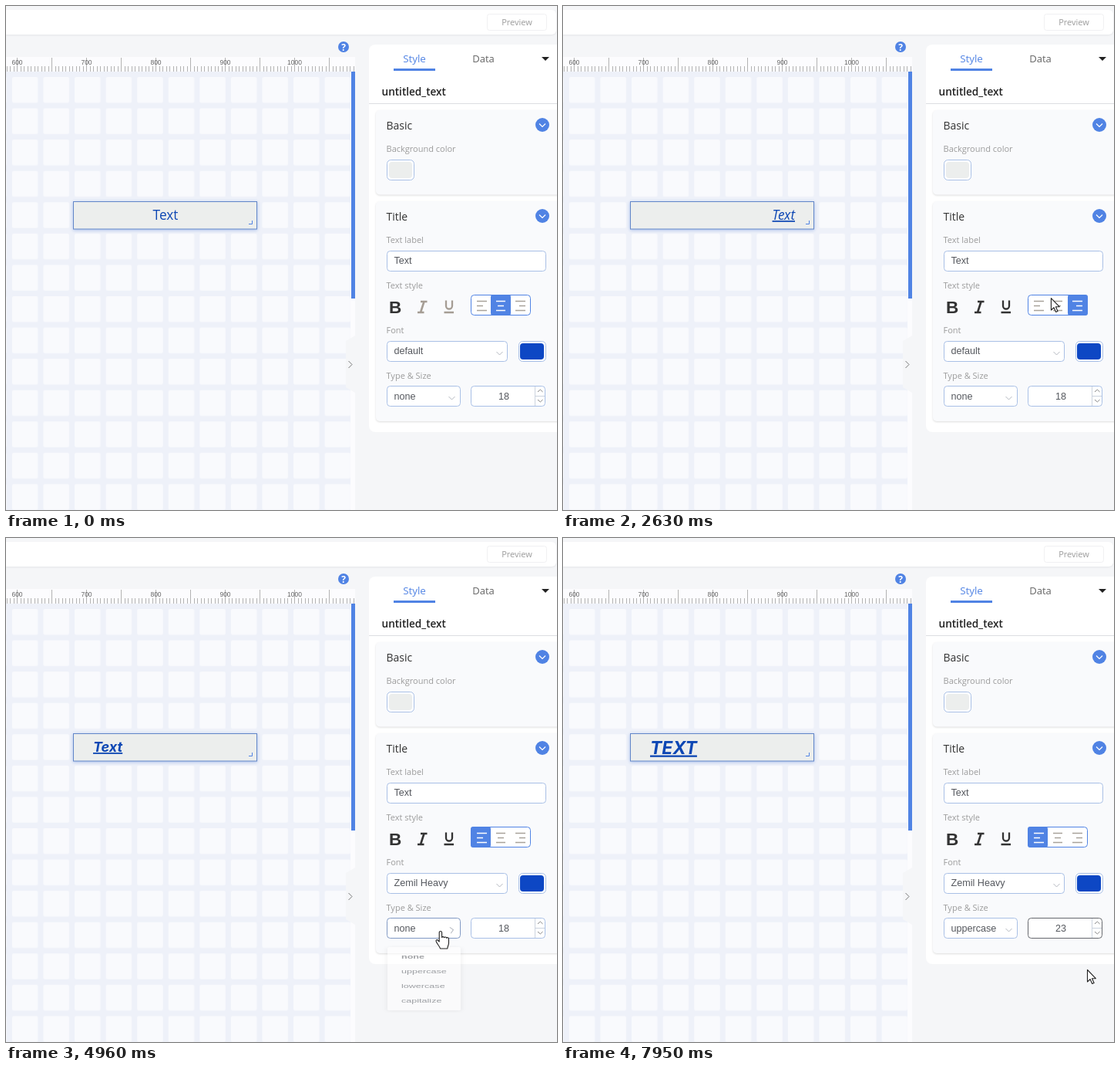
Write an HTML page that moves like this. It is 715 px wide and 653 px high and loops after 8000 ms.

```html
<!DOCTYPE html>
<html lang="en">
<head>
<meta charset="utf-8">
<title>Text style panel</title>
<style>
html, body { margin: 0; width: 100%; height: 100%; overflow: hidden; background: #f5f6f8; }
svg { display: block; width: 715px; height: 653px; }
text { font-family: "Open Sans", "Noto Sans", sans-serif; white-space: pre; }
.label { font-size: 11px; fill: #9b9b9b; }
.head { font-size: 14px; fill: #333; }
.value, .menu text { font: 12.6px "Liberation Sans", sans-serif; fill: #55585e; }
.field { fill: #fff; stroke: #a9c0e6; }
.line { fill: none; stroke: #b4b8c0; }
.blue { fill: #5083e4; }
.card { fill: #f9fafc; filter: drop-shadow(0 1px 1px #0002); }
.menu rect { fill: #fff; filter: drop-shadow(0 1px 4px #0002); }
.icon { fill: none; stroke-width: 2.6; }
.bars { fill: none; stroke-width: 1.5; }
</style>
</head>
<body>
<svg viewBox="0 0 715 653">
  <defs>
    <pattern id="grid" x="7.9" y="92" width="40.57" height="40.57" patternUnits="userSpaceOnUse">
      <rect width="33.5" height="33.5" rx="2" fill="#f9fafd"/>
    </pattern>
  </defs>
  <rect width="715" height="653" fill="#f5f6f8"/>
  <path d="M0 5H708a6 6 0 0 1 6 6V31a6 6 0 0 1-6 6H0z" fill="#fff" filter="drop-shadow(0 1px 1px #0001)"/>
  <rect x="624.5" y="10.5" width="77" height="21" rx="3" fill="#fff" stroke="#f0f0f2"/>
  <text class="label" x="663" y="25" text-anchor="middle">Preview</text>
  <circle class="blue" cx="438" cy="53" r="7"/>
  <text x="438" y="57.5" font-size="12" font-weight="700" fill="#fff" text-anchor="middle">?</text>

  <rect y="66" width="453" height="587" fill="#fcfcfe"/>
  <g id="ruler"></g>
  <rect y="85" width="447" height="568" fill="#eef1f9"/>
  <rect y="85" width="447" height="568" fill="url(#grid)"/>
  <rect class="blue" x="448" y="85" width="5" height="294"/>
  <path d="M453 427L441 434V494L453 501z" fill="#f5f6f8"/>
  <path class="line" style="stroke:#777" d="M444.500 460l4.500 4.500-4.500 4.500"/>

  <rect x="87.500" y="253.500" width="238" height="35.500" fill="#eceeed" stroke="#6286c8" filter="drop-shadow(0 1px 2px #4478d866)"/>
  <path class="line" style="stroke:#5083e4" d="M315 282.500h4.500V278"/>
  <text id="sample" fill="#0d47b4"></text>

  <path d="M715 50H479a8 8 0 0 0-8 8V544a8 8 0 0 0 8 8H715z" fill="#fff"/>
  <text x="530" y="73" font-size="13.4" fill="#5083e4" text-anchor="middle">Style</text>
  <text x="619.500" y="73" font-size="13" fill="#666" text-anchor="middle">Data</text>
  <rect class="blue" x="503" y="81" width="54" height="3"/>
  <path d="M695 66h10l-5 5z" fill="#222"/>
  <text x="487.500" y="116" font-size="13.6" font-weight="600" fill="#222">untitled_text</text>
  <path d="M471 126.500H715" stroke="#dcdee2"/>
  <rect class="card" x="480" y="135" width="240" height="109.500" rx="5"/>
  <rect class="card" x="480" y="253" width="240" height="285" rx="5"/>
  <g id="heads"></g>

  <rect class="field" x="494.500" y="199.500" width="35" height="26" rx="5"/>
  <rect x="497" y="202" width="30" height="21" rx="4" fill="#eceeed"/>
  <rect class="field" x="494.500" y="317.500" width="206" height="26" rx="4"/>
  <text class="value" x="503.500" y="334">Text</text>

  <text x="497" y="398" style="font:bold 22.500px 'Liberation Sans',sans-serif" fill="#333">B</text>
  <path id="italic" class="icon" d="M538 383h8.500M534 397h8.500M542.500 383L538 397"/>
  <path id="under" class="icon" style="stroke-width:2.3" d="M571 381.500v7a4 4 0 0 0 8 0v-7M568.500 397h12.500"/>

  <rect x="603.500" y="374.500" width="77" height="26" rx="4" fill="#fff" stroke="#5083e4"/>
  <rect id="chosen" class="blue" y="374" width="26" height="27" rx="3"/>
  <path class="bars" d="M611 382.500h13M611 388.500h8M611 394.500h13"/>
  <path class="bars" d="M636 382.500h12M638 388.500h8M636 394.500h12"/>
  <path class="bars" d="M661 382.500h13M666 388.500h8M661 394.500h13"/>

  <rect id="fontBox" class="field" x="494.500" y="434.500" width="156" height="26" rx="4"/>
  <text id="fontName" class="value" x="503.500" y="451"></text>
  <path id="fontArrow" class="line" d="M-4-2l4 4 4-4"/>
  <rect class="field" x="665.500" y="434.500" width="35" height="26" rx="5"/>
  <rect x="667" y="437" width="31" height="21" rx="4" fill="#0d47c4"/>
  <rect id="caseBox" class="field" x="494.500" y="492.500" width="95" height="26" rx="4"/>
  <text id="caseName" class="value" x="503.500" y="510"></text>
  <path id="caseArrow" class="line" d="M-4-2l4 4 4-4"/>
  <rect id="sizeBox" class="field" x="603.500" y="492.500" width="96" height="26" rx="4"/>
  <path class="line" style="stroke:#ccd3de" d="M686.500 493v25M687 505.500h12"/>
  <path class="line" style="stroke:#888" d="M690 500l3.300-3 3.300 3M690 510l3.300 3 3.300-3"/>
  <text id="sizeText" class="value" x="646" y="510" text-anchor="middle"></text>

  <g id="fontMenu" class="menu"></g>
  <g id="caseMenu" class="menu"></g>

  <g id="cursor" stroke="#222" stroke-width="1.1" stroke-linejoin="round" fill="#fff">
    <path id="arrow" d="M.5.500V16l3.600-3.300 2.600 5.800 2.400-1.100-2.600-5.700h4.800z"/>
    <path id="hand" d="M-1.800 14V2.200a1.700 1.700 0 0 1 3.400 0V8.500a1.600 1.600 0 0 1 3 .3 1.600 1.600 0 0 1 3 .5 1.600 1.600 0 0 1 2.900 1V16c0 2-1.300 3.500-1.700 7H-.5c-.6-3-4.200-6-5.400-9.500-.5-2 1.500-2.500 2.600-1z"/>
  </g>
</svg>
<script>
const $ = id => document.getElementById(id);
const set = (el, attrs) => { for (const k in attrs) el.setAttribute(k, attrs[k]); };
const LOOP = 8000;
const TIMES = { italic: 1480, under: 1960, right: 2350, left: 2980,
  fontOpen: 3610, fontPick: 4260, caseOpen: 4910, casePick: 5520 };
const CLICKS = [6900, 7040, 7210, 7390, 7490];
const HEAVY = 'Zemil Heavy';

// Cursor tip: time, x, y
const PATH = [
  [70, 517, 526], [320, 288, 268], [460, 277, 259], [600, 277, 259], [1140, 525, 386],
  [1210, 543, 388], [1340, 547, 388], [1620, 550, 388], [1820, 572, 388], [2000, 572, 388],
  [2270, 667, 386], [2420, 667, 386], [2630, 633, 378], [2850, 614, 384], [3100, 614, 386],
  [3530, 590, 436], [3660, 583, 448], [3760, 583, 448], [4120, 560, 560], [4330, 560, 560],
  [4750, 563, 512], [4960, 564, 509], [5080, 564, 509], [5350, 555, 586], [5590, 555, 586],
  [5990, 646, 535], [6060, 652, 532], [6620, 689, 506], [6900, 692, 503], [7490, 692, 503], [7950, 680, 559]
];
const HAND = [[1210, 2050], [3480, 4520], [4760, 5680], [6500, 7600]];

let ruler = '';
for (let i = -3; i < 98; i++) {
  const x = 14.5 + i * 4.5;
  ruler += `<path d="M${Math.floor(x) + .5} ${i % 10 ? 78 : 67}V85" stroke="#b3b3b3"/>`;
  if (i % 20 === 0) ruler += `<text x="${x}" y="76" font-size="8.500" fill="#666" text-anchor="middle"
    style="font-family:'Liberation Sans',sans-serif">${600 + i * 5}</text>`;
}
$('ruler').innerHTML = ruler;

const labels = [['Background color', 189], ['Text label', 307], ['Text style', 366], ['Font', 424], ['Type &amp; Size', 483]];
$('heads').innerHTML =
  [['Basic', 154], ['Title', 272]].map(([s, y]) => `<text class="head" x="493.500" y="${y + 6}">${s}</text>
    <circle class="blue" cx="696" cy="${y}" r="9"/>
    <path d="M692 ${y - 1.5}l4 4 4-4" fill="none" stroke="#fff" stroke-width="1.200"/>`).join('') +
  labels.map(([s, y]) => `<text class="label" x="493.500" y="${y}">${s}</text>`).join('');

function fillMenu(id, width, height, items) {
  $(id).innerHTML = `<rect x="495" width="${width}" height="${height}" rx="3"/>` +
    items.map(([name, font], i) =>
      `<text x="513" y="${27.5 + i * 34}"${font ? ` style="font:${font}"` : ''}>${name}</text>`).join('');
}
const bold = 'bold 12.600px "Liberation Sans",sans-serif'.replaceAll('"', "'");
fillMenu('fontMenu', 168, 256, [
  ['default', bold], ['Zemil'], [HEAVY, "900 12px Inter,sans-serif"],
  ['Zemil Narrow', "11px 'Liberation Sans',sans-serif"], ['Wegdrucktyp', "600 11px Inter,sans-serif"],
  ['Quill Hand ZK', "italic 12px 'Liberation Serif',serif"], ['Pelundo', "12px Lato,sans-serif"]]);
fillMenu('caseMenu', 95, 148, [['none', bold], ['uppercase'], ['lowercase'], ['capitalize']]);

const clamp = v => Math.max(0, Math.min(1, v));
const ease = v => 1 - (1 - clamp(v)) ** 4.5;

function showMenu(name, t, top, arrowX, arrowY) {
  const open = TIMES[name + 'Open'], close = TIMES[name + 'Pick'] + 70;
  const k = t < close ? ease((t - open) / 310) : 1 - ease((t - close) / 310);
  set($(name + 'Menu'), { transform: `translate(0 ${top}) scale(1 ${Math.max(k, .001)})`, opacity: k });
  set($(name + 'Arrow'), { transform: `translate(${arrowX} ${arrowY}) rotate(${-180 * k})` });
  $(name + 'Box').style.stroke = t > open - 80 && t < close ? '#8199c4' : '';
}

function showSample(t) {
  const heavy = t >= TIMES.fontPick, size = 18 + CLICKS.filter(c => t >= c).length;
  const align = t < TIMES.right ? 1 : t < TIMES.left ? 2 : 0;
  const el = $('sample');
  el.textContent = t >= TIMES.casePick ? 'TEXT' : 'Text';
  set(el, { x: [113, 207, 301][align], y: 277 + (size - 18) * .5,
    'text-anchor': ['start', 'middle', 'end'][align] });
  el.style.font = `${t >= TIMES.italic ? 'italic ' : ''}${heavy ? `700 ${size}px Inter` : '17.300px "Open Sans"'}, sans-serif`;
  el.style.textDecoration = t >= TIMES.under ? 'underline' : 'none';
  set($('chosen'), { x: 603 + 26 * align });
  document.querySelectorAll('.bars').forEach((b, i) => b.style.stroke = i === align ? '#fff' : '#a8a29a');
  for (const id of ['italic', 'under']) $(id).style.stroke = t >= TIMES[id] ? '#333' : '#a59d94';
  $('fontName').textContent = heavy ? HEAVY : 'default';
  $('caseName').textContent = t >= TIMES.casePick ? 'uppercase' : 'none';
  $('sizeText').textContent = size;
  $('sizeBox').style.stroke = t > 6480 ? '#66686e' : '';
}

function showCursor(t) {
  const next = PATH.findIndex(p => p[0] > t);
  const b = next < 0 ? PATH[PATH.length - 1] : PATH[next], a = PATH[next - 1] || b;
  const k = b === a ? 0 : clamp((t - a[0]) / (b[0] - a[0]));
  const hand = HAND.some(([from, to]) => t >= from && t < to);
  set($('cursor'), { transform: `translate(${a[1] + (b[1] - a[1]) * k} ${a[2] + (b[2] - a[2]) * k})`,
    visibility: t < 70 ? 'hidden' : 'visible' });
  $('arrow').style.display = hand ? 'none' : '';
  $('hand').style.display = hand ? '' : 'none';
}

function draw() {
  const t = performance.now() % LOOP;
  showSample(t);
  showMenu('font', t, 471, 640.5, 450);
  showMenu('case', t, 530, 578.5, 508);
  showCursor(t);
  requestAnimationFrame(draw);
}
draw();
</script>
</body>
</html>
```
